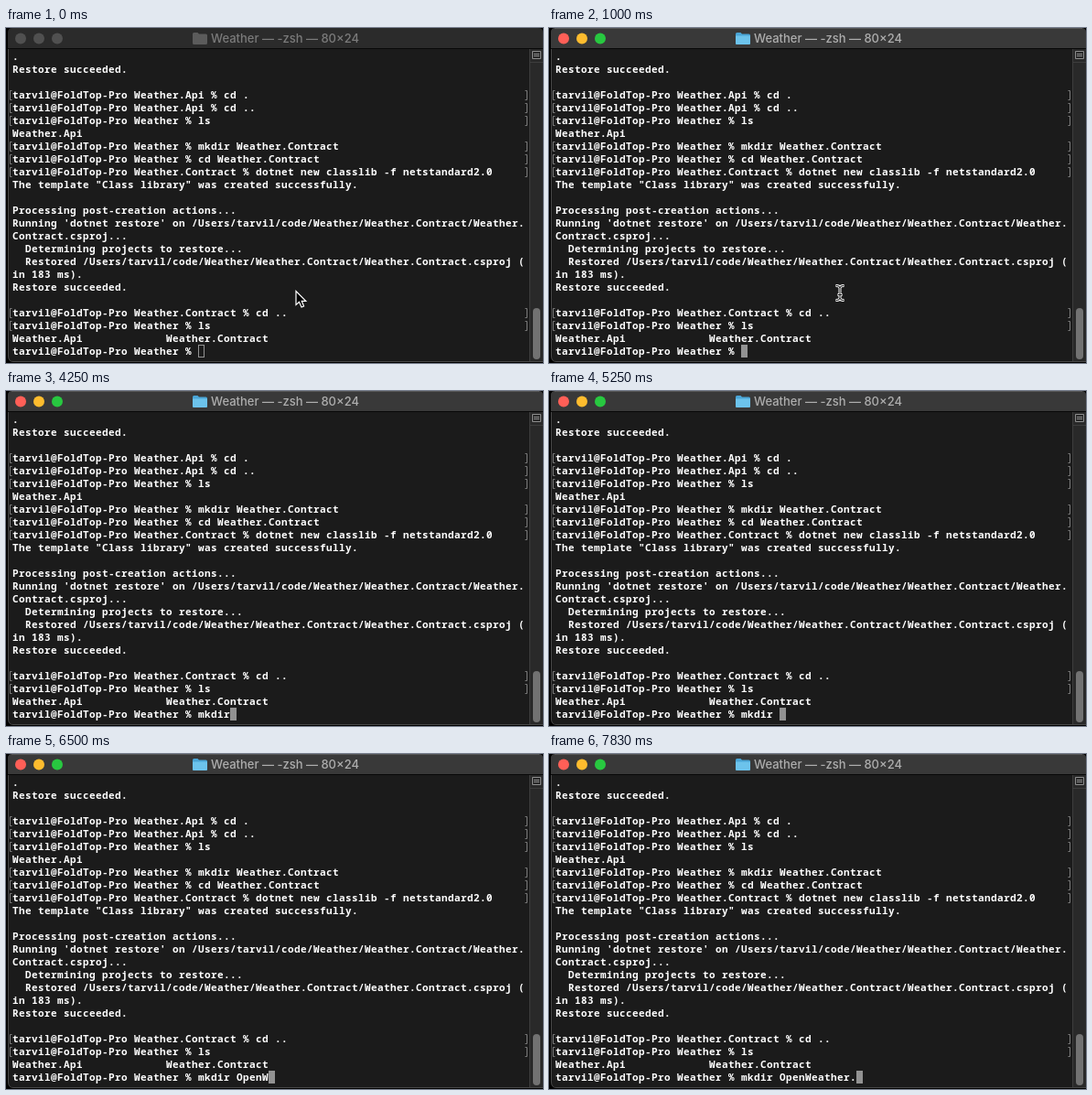
These frames come from a looping animation (587x366 px, 8 s). An HTML page:

```html
<!DOCTYPE html>
<html lang="en">
<head>
<meta charset="utf-8">
<title>Terminal</title>
<style>
  html, body { margin: 0; width: 100%; height: 100%; overflow: hidden; background: #000; }
  svg { display: block; }
  .title { font: 500 13px Inter, sans-serif; }
  #screen text {
    font: 600 11px "Noto Sans Mono", "DejaVu Sans Mono", monospace;
    letter-spacing: .4px;
    white-space: pre;
    fill: #fff;
  }
  #marks { fill: none; stroke: #7c7c7c; }
</style>
</head>
<body>
<svg width="587" height="366" viewBox="0 0 587 366">
  <defs>
    <path id="bar" d="M2 22V5Q2 0 7 0H582Q587 0 587 5V22Z"/>
    <path id="folder" d="M204 6.5Q204 5 205.500 5H209.500L211 6.500H218.500Q220 6.500 220 8V16.500Q220 18 218.500 18H205.500Q204 18 204 16.500Z"/>
    <g id="lights">
      <circle cx="16" cy="11.500" r="6"/>
      <circle cx="36" cy="11.500" r="6"/>
      <circle cx="56" cy="11.500" r="6"/>
    </g>
  </defs>

  <path d="M2 10H587V364H8Q2 364 2 358Z" fill="#1b1b1b"/>
  <path d="M2.500 22V358Q2.500 364.500 8 364.500H587" fill="none" stroke="#484848"/>

  <g>
    <use href="#bar" fill="#2b2b2b"/>
    <use href="#lights" fill="#505050"/>
    <use href="#folder" fill="#5b5b5b"/>
    <text class="title" x="224" y="16" fill="#7b7b7b">Weather — -zsh — 80×24</text>
  </g>
  <g id="active">
    <use href="#bar" fill="#393939"/>
    <path d="M6 .500H583" stroke="#555"/>
    <circle cx="16" cy="11.500" r="6" fill="#ff5f57"/>
    <circle cx="36" cy="11.500" r="6" fill="#febc2e"/>
    <circle cx="56" cy="11.500" r="6" fill="#28c840"/>
    <use href="#folder" fill="#4aa5d6"/>
    <path d="M204 8.500H220V16.500Q220 18 218.500 18H205.500Q204 18 204 16.500Z" fill="#6cc3ec"/>
    <text class="title" x="224" y="16" fill="#aeaeae">Weather — -zsh — 80×24</text>
  </g>
  <path d="M2 22.500H587" stroke="#080808"/>

  <rect x="572" y="23" width="15" height="341" fill="#292929"/>
  <path d="M572.500 23V364M572 37.500H587" stroke="#3d3d3d"/>
  <path d="M575.500 25.500H584.500V33.500H575.500ZM577 28.500H583M577 30.500H583" fill="none" stroke="#8c8c8c"/>
  <rect x="576" y="306" width="8" height="56" rx="4" fill="#727272"/>

  <rect id="block" y="346" width="7" height="14" fill="#929292"/>
  <rect id="outline" x="210.500" y="346.500" width="6" height="13" fill="none" stroke="#929292"/>
  <g id="screen"></g>
  <path id="marks"/>

  <path id="arrow" d="M317 287.500V302.500L320.500 299.300L323 305L325.600 303.900L323.200 298.300H327.800Z" fill="#000" stroke="#fff" stroke-width="1.200"/>
  <g id="beam" fill="none">
    <path d="M313.500 281.500Q318 281.500 318 284V295Q318 297.500 313.500 297.500M322.500 281.500Q318 281.500 318 284M322.500 297.500Q318 297.500 318 295M315.500 291.500H320.500" stroke="#fff" stroke-width="3"/>
    <path d="M314 281.500Q318 281.500 318 284V295Q318 297.500 314 297.500M322 281.500Q318 281.500 318 284M322 297.500Q318 297.500 318 295M316 291.500H320" stroke="#111"/>
  </g>
</svg>
<script>
const LOOP = 8000, FOCUS = 750, CELL = 7, ROW = 14;
const $ = id => document.getElementById(id);
const prompt = (dir, command) => `tarvil@FoldTop-Pro ${dir} % ${command}`;
const home = '/Users/tarvil/code/Weather/Weather.Contract/';

const lines = [
  '.',
  'Restore succeeded.',
  '',
  prompt('Weather.Api', 'cd .'),
  prompt('Weather.Api', 'cd ..'),
  prompt('Weather', 'ls'),
  'Weather.Api',
  prompt('Weather', 'mkdir Weather.Contract'),
  prompt('Weather', 'cd Weather.Contract'),
  prompt('Weather.Contract', 'dotnet new classlib -f netstandard2.0'),
  'The template "Class library" was created successfully.',
  '',
  'Processing post-creation actions...',
  `Running 'dotnet restore' on ${home}Weather.`,
  'Contract.csproj...',
  '  Determining projects to restore...',
  `  Restored ${home}Weather.Contract.csproj (`,
  'in 183 ms).',
  'Restore succeeded.',
  '',
  prompt('Weather.Contract', 'cd ..'),
  prompt('Weather', 'ls'),
  'Weather.Api'.padEnd(24) + 'Weather.Contract',
  prompt('Weather', '')
];
// The directory listing before the first "cd .." result keeps the shorter prompt.
const command = 'mkdir OpenWeather.';
const keyTimes = [3580, 3790, 4000, 4170, 4250, 5250, 5580, 5710, 5830, 5920,
  6500, 6830, 6920, 7330, 7430, 7530, 7630, 7830];

let marks = '';
const rows = lines.map((line, i) => {
  const text = document.createElementNS('http://www.w3.org/2000/svg', 'text');
  text.setAttribute('x', 7);
  text.setAttribute('y', 35 + ROW * i);
  text.textContent = line;
  $('screen').append(text);
  if (line.includes(' % ') && i < lines.length - 1) {
    const y = 26.5 + ROW * i;
    marks += `M6.5 ${y}H4.500v10h2M567.500 ${y}h2v10h-2`;
  }
  return text;
});
$('marks').setAttribute('d', marks);

const input = rows[rows.length - 1];
const base = lines[lines.length - 1];
const show = (id, on) => $(id).style.display = on ? '' : 'none';

function draw(now) {
  const t = now % LOOP;
  const typed = keyTimes.filter(k => k <= t).length;
  const focused = t >= FOCUS;
  const fade = focused ? Math.min(1, (Math.floor((t - FOCUS) / 50) + 1) / 6) : 0;

  input.textContent = base + command.slice(0, typed);
  $('block').setAttribute('x', 7 + CELL * (base.length + typed));
  $('active').style.opacity = fade;
  show('block', focused);
  show('outline', !focused);
  show('arrow', !focused);
  show('beam', focused && !typed);
}

const start = performance.now();
function tick() {
  draw(performance.now() - start);
  requestAnimationFrame(tick);
}
draw(0);
requestAnimationFrame(tick);
</script>
</body>
</html>
```
